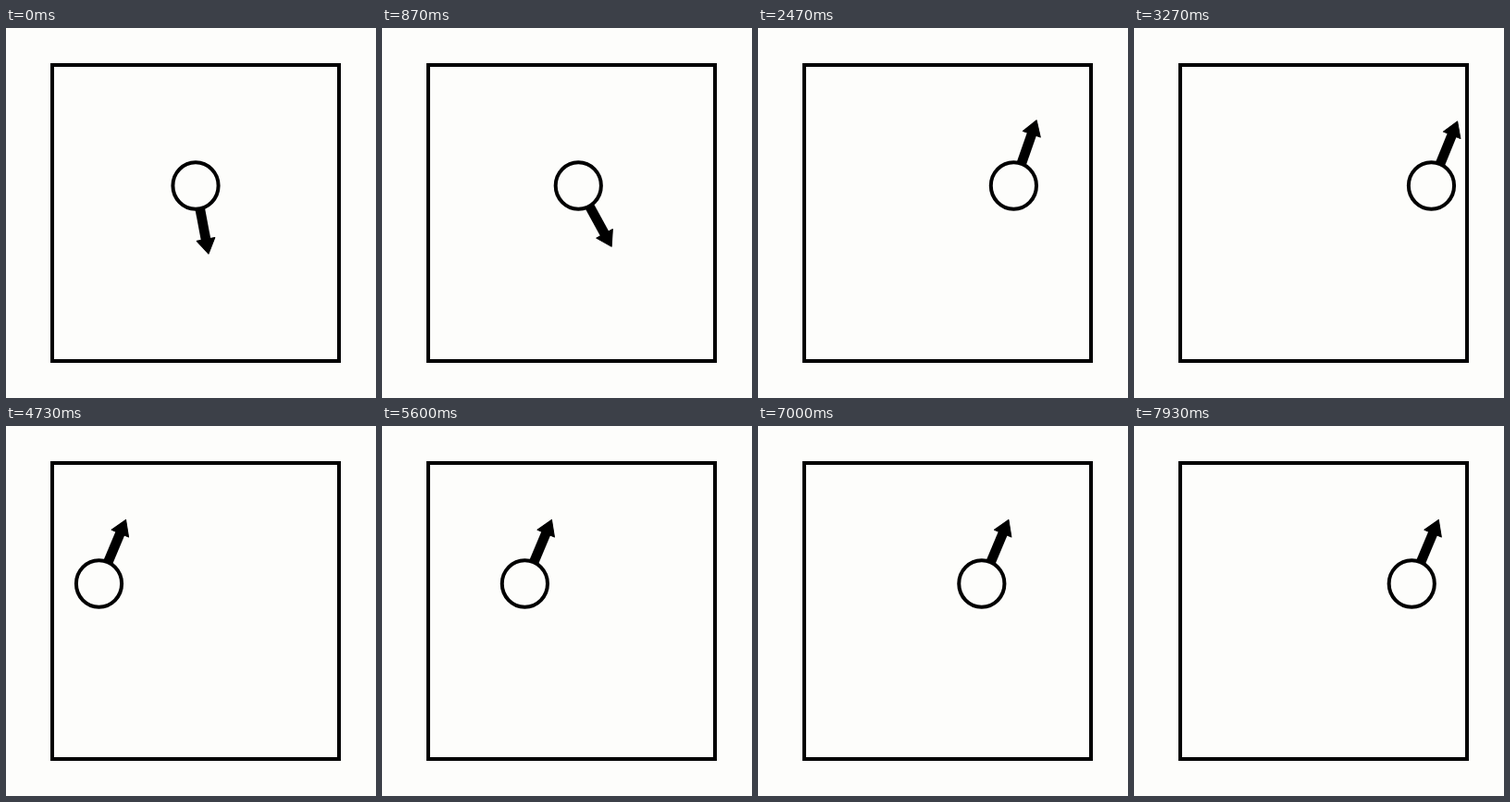
Write an HTML page with a canvas that moves like this. It is 400 px wide and 400 px high and loops after 8 s.

```html
<!DOCTYPE html>
<html lang="en">
<head>
<meta charset="utf-8">
<title>Particle in a periodic box</title>
<style>
  html, body { margin: 0; width: 100%; height: 100%; overflow: hidden; background: #fdfdfb; }
  canvas { display: block; }
</style>
</head>
<body>
<canvas id="stage" width="400" height="400"></canvas>
<script>
const ctx = document.getElementById('stage').getContext('2d');
const LOOP = 8000, STEP = 200 / 3;
const BOX = { x: 50, y: 40, w: 310, h: 320 };
const CENTER = { x: 205, y: 170.5 };

// Starts at rest and approaches a constant speed like a critically damped system
function travel(t) {
  const speed = 0.0626, tau = 730;
  return speed * (t - 2 * tau + (2 * tau + t) * Math.exp(-t / tau));
}

// Degrees, counterclockwise from the x axis: a slow start, a fast swing, a small overshoot
function heading(t) {
  const swing = 1 - Math.exp(-Math.exp((t - 1397) / 265));
  const u = Math.max(0, t - 1600) / 550;
  const overshoot = 4.5 * u * u * Math.exp(2 - 2 * u);
  return -80 + 147.2 * swing + overshoot;
}

function drawParticle(x, angle) {
  ctx.save();
  ctx.translate(x, CENTER.y);
  ctx.lineWidth = 4;
  ctx.beginPath();
  ctx.ellipse(0, 0, 24.6, 25.2, 0, 0, 2 * Math.PI);
  ctx.stroke();

  ctx.rotate(-angle * Math.PI / 180);
  ctx.fillRect(25, -5.3, 36, 10.6);
  ctx.lineWidth = 1;
  ctx.beginPath();
  ctx.moveTo(59, -10);
  ctx.lineTo(75, 0);
  ctx.lineTo(59, 10);
  ctx.closePath();
  ctx.fill();
  ctx.stroke();
  ctx.restore();
}

function draw(t) {
  ctx.fillStyle = '#fdfdfb';
  ctx.fillRect(0, 0, 400, 400);
  ctx.fillStyle = ctx.strokeStyle = '#000';

  // Copies one box width apart let the particle leave on one side and enter on the other
  const x = BOX.x + (CENTER.x + travel(t) - BOX.x) % BOX.w;
  ctx.save();
  ctx.beginPath();
  ctx.rect(BOX.x, BOX.y, BOX.w, BOX.h);
  ctx.clip();
  ctx.lineJoin = 'round';
  for (const shift of [-BOX.w, 0, BOX.w]) drawParticle(x + shift, heading(t));
  ctx.restore();

  ctx.lineWidth = 4;
  ctx.strokeRect(BOX.x, BOX.y, BOX.w, BOX.h);
}

function tick() {
  const t = performance.now() % LOOP;
  const step = Math.floor((t + 4) / STEP) % Math.round(LOOP / STEP);
  draw(step * STEP);
  requestAnimationFrame(tick);
}
tick();
</script>
</body>
</html>
```
